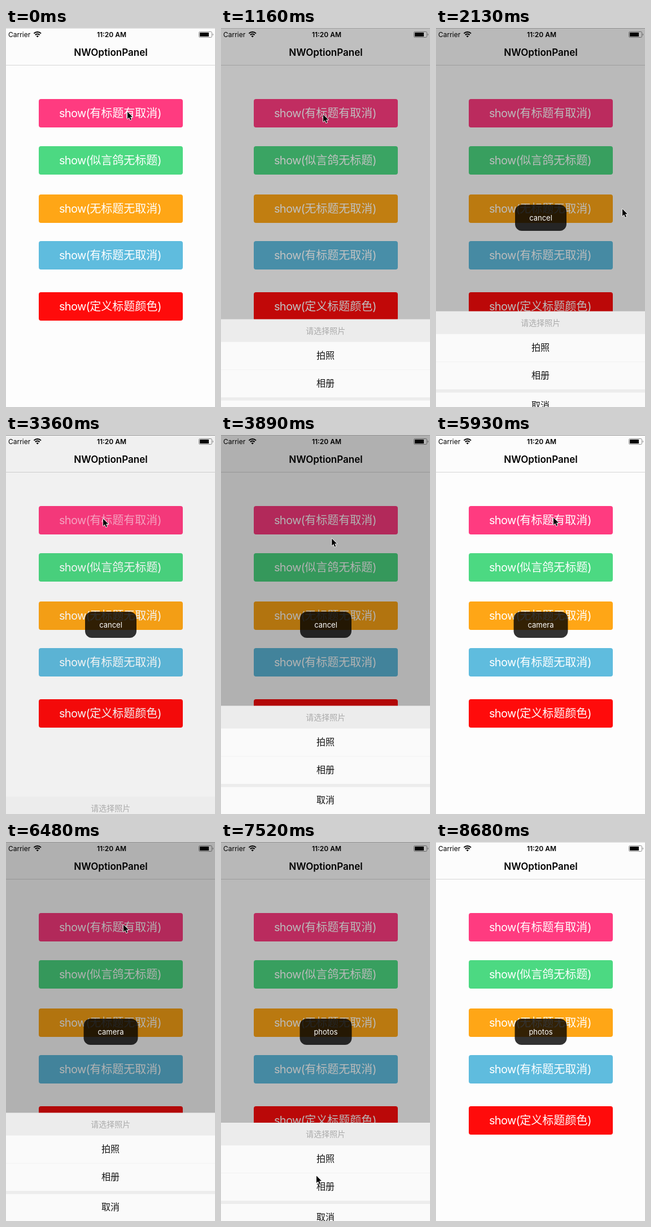
Animation, 370 px wide and 667 px high, one loop 8710 ms. Source, as an HTML page:

```html
<!DOCTYPE html>
<html lang="zh-CN">
<head>
<meta charset="utf-8">
<title>Action sheet</title>
<style>
  html, body { margin: 0; width: 100%; height: 100%; overflow: hidden; background: #fdfdfd; }
  svg { display: block; width: 370px; height: 667px; font-family: Inter, "Noto Sans CJK SC", "Noto Sans CJK", sans-serif; }
  .mid { text-anchor: middle; }
  .label { font-size: 20px; fill: #fff; }
  .latin { letter-spacing: -.7px; }
  .row { font-size: 16px; fill: #111; }
</style>
</head>
<body>
<svg viewBox="0 0 370 667">
  <rect width="370" height="667" fill="#fdfdfd"/>
  <rect width="370" height="65" fill="#fcfcfc"/>
  <rect y="65" width="370" height="1" fill="#d6d6d6"/>

  <g id="status">
    <text x="4" y="15.5" font-size="12">Carrier</text>
    <g fill="none" stroke="#000" stroke-width="2">
      <path d="M49.4 9.6a9 9 0 0 1 12.6 0"/>
      <path d="M51.8 12.2a5.6 5.6 0 0 1 7.8 0"/>
    </g>
    <path d="M55.7 16.6l-2.2-2.4a3.2 3.2 0 0 1 4.4 0z"/>
    <text class="mid" x="187" y="15.5" font-size="12" font-weight="600">11:20 AM</text>
    <rect x="341.5" y="6.5" width="23" height="10" rx="2" fill="none" stroke="#8c8c8c"/>
    <rect x="343" y="8" width="16" height="7" rx=".5"/>
    <path d="M366 9.5q2 2 0 4z" fill="#777"/>
  </g>
  <text class="mid" x="185.5" y="49" font-size="17" font-weight="600">NWOptionPanel</text>

  <g id="buttons"></g>
  <rect id="dim" width="370" height="667"/>
  <rect id="edge" width="370" height="1"/>

  <g id="sheet">
    <rect width="370" height="191" fill="#ececec"/>
    <rect y="40" width="370" height="48.5" fill="#fafafa"/>
    <rect y="89" width="370" height="48.5" fill="#fafafa"/>
    <rect y="143" width="370" height="48" fill="#fafafa"/>
    <text class="mid" x="185.3" y="25" font-size="14" fill="#aaa">请选择照片</text>
    <text class="mid row" x="185" y="69">拍照</text>
    <text class="mid row" x="185" y="118">相册</text>
    <text class="mid row" x="185" y="171.5">取消</text>
  </g>

  <g id="toast">
    <rect id="toastBox" y="311" height="46" rx="12" fill-opacity=".8"/>
    <text id="toastText" class="mid" x="185.5" y="339" font-size="13" fill="#fff"></text>
  </g>
  <path id="cursor" d="M1 1.5V14L4 11.3L6 16L8 15.2L6 10.6H10Z" stroke="#fff" stroke-width="1.6" stroke-linejoin="round" paint-order="stroke"/>
</svg>

<script>
const LOOP = 8710;
const SHEET_HEIGHT = 190.5;
const $ = id => document.getElementById(id);
const ramp = (t, start, length) => Math.min(1, Math.max(0, (t - start) / length));
const ease = v => (1 - Math.cos(Math.PI * v)) / 2;
const mix = (a, b, k) => a + (b - a) * k;

const buttons = [
  [125, '#ff3b80', '有标题有取消'],
  [208, '#4cd982', '似言鸽无标题'],
  [293, '#ffa616', '无标题无取消'],
  [375, '#5fbcde', '有标题无取消'],
  [465, '#ff0b0b', '定义标题颜色']
];
$('buttons').innerHTML = buttons.map(([y, color, label]) => `
  <rect x="58" y="${y}" width="255" height="50" rx="4" fill="${color}"/>
  <text class="label" x="94" y="${y + 32}"><tspan class="latin">show(</tspan><tspan>${label}</tspan><tspan>)</tspan></text>`).join('');
const pressedLabel = document.querySelector('.label');

// Each visit: the sheet rises at `up` after a press, and falls at `down` after a tap.
const visits = [
  { up: 940, down: 2065, press: [180, 151], tap: [329, 317], bow: 0, toast: 'cancel' },
  { up: 3280, down: 4789, press: [171, 146], tap: [181, 538], bow: 85, toast: 'camera' },
  { up: 6100, down: 7462, press: [207, 144], tap: [168, 586], bow: 0, toast: 'photos' }
];
const cursorStart = [214, 146];
const cursorExit = [331, 669];

// The cursor goes to the tap point while the sheet is open, then on to the next press.
const legs = [{ from: 410, to: 700, point: visits[0].press, bow: 0 }];
visits.forEach(({ up, down, tap, bow }, i) => {
  const next = visits[i + 1];
  legs.push({ from: up + 440, to: down - 180, point: tap, bow });
  legs.push({ from: down + 90, to: down + 790, point: next ? next.press : cursorExit, bow: 0 });
});

function cursorAt(t) {
  let [x, y] = cursorStart;
  for (const { from, to, point, bow } of legs) {
    const k = ease(ramp(t, from, to - from));
    x = mix(x, point[0], k) + bow * Math.sin(Math.PI * k);
    y = mix(y, point[1], k);
  }
  return [x, y];
}

// The top edge darkens with the first dimming and stays dark until the loop's end.
function edgeColor(t) {
  const dark = t < 8680 ? ease(ramp(t, visits[0].up, 310)) : 0;
  const v = Math.round(mix(216, 148, dark));
  return `rgb(${v},${v},${v})`;
}

function renderToast(t) {
  const visit = visits.find(({ down }) => t >= down && t < down + 2220);
  $('toast').setAttribute('opacity', visit ? 1 - ramp(t, visit.down + 2020, 200) : 0);
  if (!visit) return;
  const text = $('toastText');
  text.textContent = visit.toast;
  const width = Math.round(text.getComputedTextLength()) + 50;
  $('toastBox').setAttribute('x', 185.5 - width / 2);
  $('toastBox').setAttribute('width', width);
}

function render(t) {
  let shown = 0, labelAlpha = 1;
  for (const { up, down } of visits) {
    shown += ease(ramp(t, up, 310)) - ease(ramp(t, down, 300));
    if (t > up - 130) labelAlpha = mix(.3, 1, ramp(t, up - 10, 240));
  }
  pressedLabel.setAttribute('fill-opacity', labelAlpha);
  $('dim').setAttribute('fill-opacity', .3 * shown);
  $('edge').setAttribute('fill', edgeColor(t));
  const top = Math.round((667 - SHEET_HEIGHT * shown) * 2) / 2;
  $('sheet').setAttribute('transform', `translate(0 ${top})`);
  renderToast(t);
  $('cursor').setAttribute('transform', `translate(${cursorAt(t).join(' ')})`);
}

const start = performance.now();
function tick() {
  render((performance.now() - start) % LOOP);
  requestAnimationFrame(tick);
}
tick();
</script>
</body>
</html>
```
